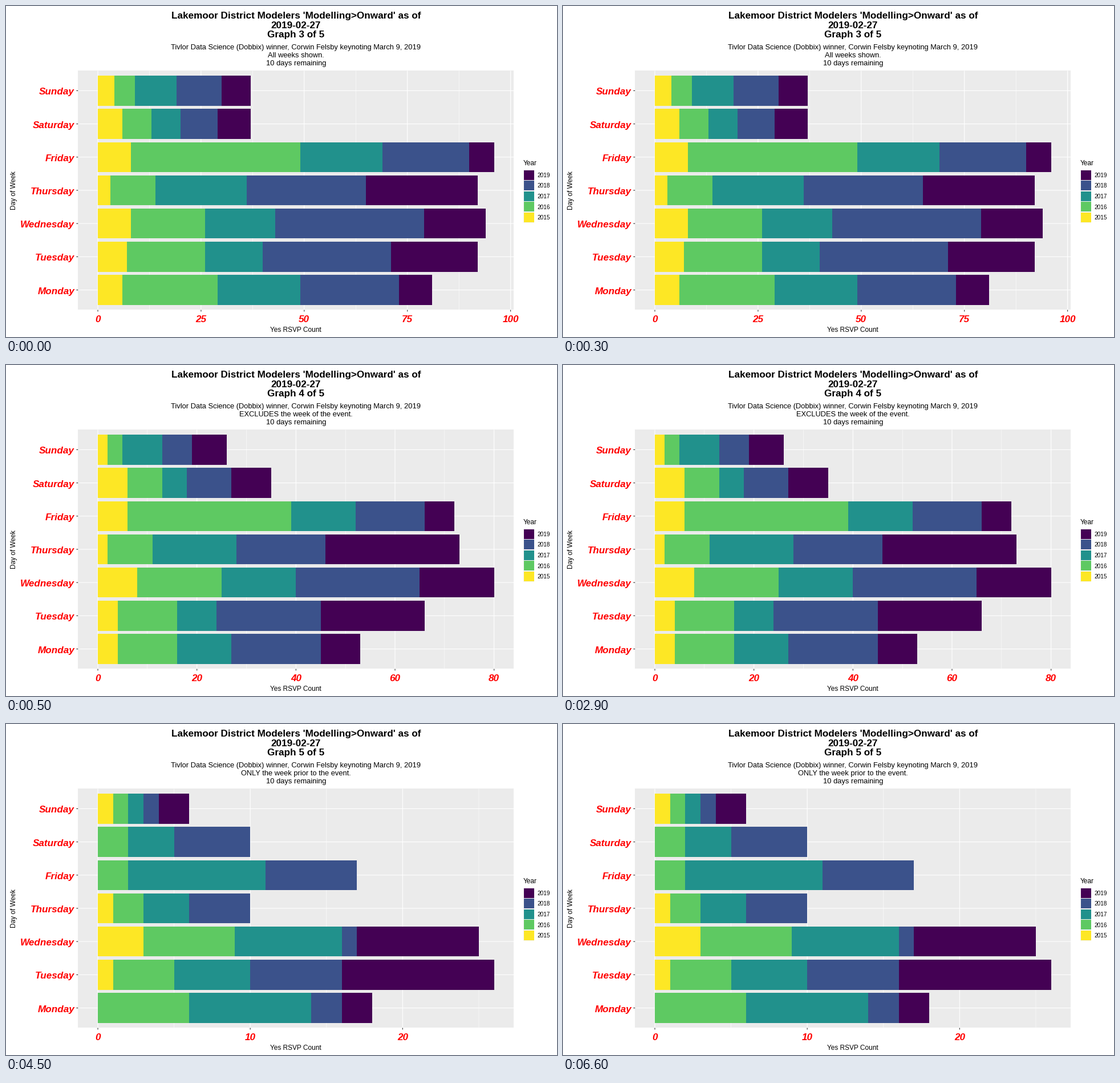
Animation of 966 by 580 pixels, one loop 8000 ms. Source, as a matplotlib script:

```python
import matplotlib.pyplot as plt
import numpy as np
from matplotlib.animation import FuncAnimation
from matplotlib.patches import Rectangle

W, H, DPI = 966, 580, 72
STEP = 500  # ms per frame
LEFT, RIGHT, TOP, BOTTOM = 126.3, 890.4, 113.45, 532.5
PAD = (RIGHT - LEFT) / 22
ROW = (BOTTOM - TOP) / 7.2
MID_X, MID_Y = (LEFT + RIGHT) / 2, (TOP + BOTTOM) / 2
BIG, MEDIUM, SMALL, TINY = 17.1, 12.84, 11.85, 10

DAYS = ["Sunday", "Saturday", "Friday", "Thursday", "Wednesday", "Tuesday", "Monday"]
YEARS = range(2015, 2020)
COLORS = plt.get_cmap("viridis")(np.linspace(1, 0, len(YEARS)))

# RSVPs per day (rows) and year (columns)
before = np.array([[2, 3, 8, 6, 7], [6, 7, 5, 9, 8], [6, 33, 13, 14, 6],
                   [2, 9, 17, 18, 27], [8, 17, 15, 25, 15],
                   [4, 12, 8, 21, 21], [4, 12, 11, 18, 8]])
prior_week = np.array([[1, 1, 1, 1, 2], [0, 2, 3, 5, 0], [0, 2, 9, 6, 0],
                       [1, 2, 3, 4, 0], [3, 6, 7, 1, 8],
                       [1, 4, 5, 6, 10], [0, 6, 8, 2, 2]])
# the latest year has not reached its event week yet
event_week = np.array([[2, 2, 2, 5], [0, 0, 2, 0], [2, 8, 7, 7], [1, 2, 5, 11],
                       [0, 1, 2, 11], [3, 7, 6, 10], [2, 11, 9, 6]])
all_weeks = before + np.pad(event_week, ((0, 0), (0, 1)))

# start in ms, graph number, note, tick spacing, counts
SCENES = [
    (0, 3, "All weeks shown.", 25, all_weeks),
    (500, 4, "EXCLUDES the week of the event.", 20, before),
    (4500, 5, "ONLY the week prior to the event.", 10, prior_week),
]

plt.rcParams["font.family"] = "Liberation Sans"
fig = plt.figure(figsize=(W / DPI, H / DPI), dpi=DPI, facecolor="white")
ax = fig.add_axes([0, 0, 1, 1])


def text(x, y, s, size, ha="center", **style):
    ax.text(x, y, s, fontsize=size, ha=ha, va="baseline", **style)


def red(x, y, s, ha="center"):
    text(x, y, s, BIG, ha, color="red", weight="bold", style="italic")


def rect(x0, y0, x1, y1, color, z=1):
    x0, y0, x1, y1 = (round(v) for v in (x0, y0, x1, y1))
    ax.add_patch(Rectangle((x0, y0), x1 - x0, y1 - y0, fc=color, lw=0,
                           antialiased=False, zorder=z))


def line(xs, ys, color="white", width=1.14):
    ax.plot(xs, ys, color=color, lw=width, snap=False, zorder=1.5,
            solid_capstyle="butt")


def titles(number, note):
    heads = ["Lakemoor District Modelers 'Modelling>Onward' as of",
             "2019-02-27", f"Graph {number} of 5"]
    subs = ["Tivlor Data Science (Dobbix) winner, Corwin Felsby keynoting March 9, 2019",
            note, "10 days remaining"]
    for k, (head, sub) in enumerate(zip(heads, subs)):
        text(MID_X, round(22.2 + 16.5 * k), head, BIG, weight="bold")
        text(MID_X, 76 + 14 * k, sub, MEDIUM)
    text(MID_X, 571, "Yes RSVP Count", SMALL)
    text(17, MID_Y + 34, "Day of Week", SMALL, "left",
         rotation=90, rotation_mode="anchor")


def legend():
    text(907, 279, "Year", SMALL, "left")
    rect(907, 287, 926, 380, "#F2F2F2")
    for k, (year, color) in enumerate(zip(reversed(YEARS), COLORS[::-1])):
        y = 287 + 18.5 * k
        rect(908, y + 0.75, 925.5, y + 17.75, color)
        text(931, y + 13, str(year), TINY, "left")


def x_axis(tick, scale):
    for k, value in enumerate(np.arange(0, (RIGHT - LEFT - PAD) / scale, tick / 2)):
        x = LEFT + PAD + value * scale
        if k % 2:
            line([x, x], [TOP, BOTTOM], width=0.57)
        else:
            line([x, x], [TOP, BOTTOM])
            line([x, x], [BOTTOM, BOTTOM + 2.9], "#333333")
            red(x, 554, f"{value:.0f}")


def bars(counts, scale):
    for i, (day, row) in enumerate(zip(DAYS, counts)):
        y = TOP + (0.6 + i) * ROW
        line([LEFT, RIGHT], [y, y])
        line([LEFT - 2.9, LEFT], [y, y], "#333333")
        red(120, y + 7, day, "right")
        edges = LEFT + PAD + scale * np.cumsum([0, *row])
        for x0, x1, color in zip(edges, edges[1:], COLORS):
            if x1 > x0:
                rect(x0, y - 0.45 * ROW, x1, y + 0.45 * ROW, color, 2)


def draw(i):
    ax.clear()
    ax.set(xlim=(0, W), ylim=(H, 0))
    ax.axis("off")
    _, number, note, tick, counts = [s for s in SCENES if s[0] <= i * STEP][-1]
    scale = (RIGHT - LEFT - 2 * PAD) / counts.sum(axis=1).max()
    titles(number, note)
    rect(LEFT, TOP, RIGHT, BOTTOM, "#EBEBEB")
    x_axis(tick, scale)
    bars(counts, scale)
    legend()
    return []


anim = FuncAnimation(fig, draw, frames=16, init_func=lambda: draw(0),
                     interval=STEP, repeat=True, repeat_delay=0)
plt.show()
```
